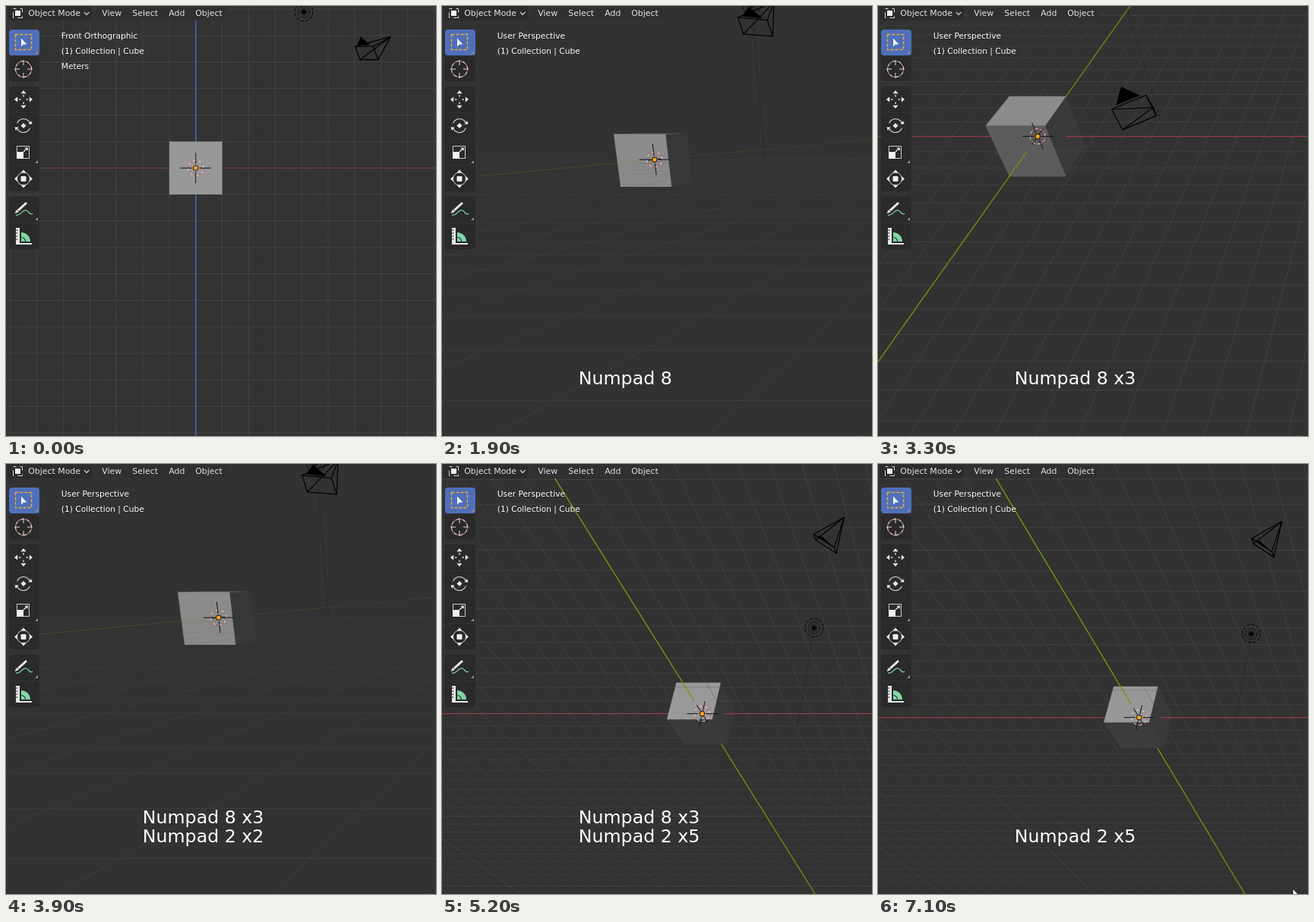
Animation, 566 px wide and 566 px high, one loop 7.2 s. Source, as an HTML page with a canvas:

```html
<!DOCTYPE html>
<html>
<head>
<meta charset="utf-8">
<style>
  html, body { margin: 0; width: 100%; height: 100%; overflow: hidden; background: #323232; }
  canvas { display: block; }
</style>
</head>
<body>
<canvas id="c" width="566" height="566"></canvas>
<script>
const g = document.getElementById('c').getContext('2d');
const LOOP = 7200, TICK = 100, FONT = '"DejaVu Sans", sans-serif';

// View: pixels per unit, orbit distance, pivot, screen centre
const S = 34.85, DIST = 31.5, PIVOT = [15.56, -3.72, -6.75], CX = 792, CY = 448.5;
const LIGHT = [4.08, 1, 5.9], CAM = [7.36, -6.93, 4.96];

// Key presses: time, key, resulting tilt
const PRESSES = [[1500, 8, 15], [2300, 8, 30], [2700, 8, 45], [3500, 2, 30],
                 [3800, 2, 15], [4100, 2, 0], [4500, 2, -15], [5200, 2, -30]];
const EIGHT_GONE = 5800;

// Face greys for tilts -30, -15, ... 45
const SHADES = {
  front: [152, 166, 152, 139, 116, 92],
  top: [120, 120, 120, 120, 130, 139],
  bottom: [60, 44, 38, 35, 35, 35],
  right: [57, 51, 53, 55, 56, 57]
};

let ortho, tilt, sin, cos, eye;

const clamp = (v, a = 0, b = 1) => Math.min(b, Math.max(a, v));
const ease = x => x * x * (3 - 2 * x);
const add = (p, ...terms) => p.map((v, i) => terms.reduce((s, [k, d]) => s + k * d[i], v));

function setView(t) {
  tilt = 0;
  for (const [at, , to] of PRESSES)
    if (t >= at) tilt += (to - tilt) * ease(clamp((t - at + 162) / 200));
  ortho = t < PRESSES[0][0];
  const a = tilt * Math.PI / 180;
  sin = Math.sin(a);
  cos = Math.cos(a);
  eye = [PIVOT[0], PIVOT[1] - DIST * cos, PIVOT[2] + DIST * sin];
}

function project([x, y, z]) {
  x -= PIVOT[0]; y -= PIVOT[1]; z -= PIVOT[2];
  const depth = DIST + y * cos - z * sin;
  const k = ortho ? S : S * DIST / depth;
  return [CX + k * x, CY - k * (y * sin + z * cos), depth];
}

function path(points, close) {
  g.beginPath();
  points.forEach(([x, y], i) => i ? g.lineTo(x, y) : g.moveTo(x, y));
  if (close) g.closePath();
}
function stroke(points, color, width = 1, close) {
  path(points, close);
  g.strokeStyle = color;
  g.lineWidth = width;
  g.stroke();
}
function fill(points, color) {
  path(points, true);
  g.fillStyle = color;
  g.fill();
}
function ring(x, y, r, color, width = 1, from = 0, to = 2 * Math.PI) {
  g.beginPath();
  g.arc(x, y, r, from, to);
  g.strokeStyle = color;
  g.lineWidth = width;
  g.stroke();
}
function dot(x, y, r, color) {
  g.beginPath();
  g.arc(x, y, r, 0, 2 * Math.PI);
  g.fillStyle = color;
  g.fill();
}
function box(x, y, w, h, color, r = 0) {
  g.beginPath();
  g.roundRect(x, y, w, h, r);
  g.fillStyle = color;
  g.fill();
}
function text(s, x, y, size, color) {
  g.font = size + 'px ' + FONT;
  g.fillStyle = color;
  g.fillText(s, x, y);
}

function flatGrid() {
  const [ox, oy] = project([0, 0, 0]);
  const lines = (step, color) => {
    for (let v = ox % step; v < 566; v += step) stroke([[v, 0], [v, 566]], color);
    for (let v = oy % step; v < 566; v += step) stroke([[0, v], [566, v]], color);
  };
  lines(S / 10, 'rgba(84,84,84,.07)');
  lines(S, 'rgba(84,84,84,.5)');
  stroke([[0, oy], [566, oy]], '#7c4048', 1.2);
  stroke([[ox, 0], [ox, 566]], '#3f6ab2', 1.6);
}

// Returns two painters: floor behind the cube and floor in front of it
function floor() {
  const layers = [new Map(), new Map()];
  const segment = (a, b, kind) => {
    const p = project(a), q = project(b);
    if (p[2] < .5 || q[2] < .5) return;
    if (Math.max(p[0], q[0]) < 0 || Math.min(p[0], q[0]) > 566) return;
    if (Math.max(p[1], q[1]) < 0 || Math.min(p[1], q[1]) > 566) return;
    const m = a.map((v, i) => (v + b[i]) / 2);
    const slope = Math.abs(eye[2]) / Math.hypot(...m.map((v, i) => v - eye[i]));
    let alpha = 1 - (1 - slope) ** 4;
    if (kind == 'unit') alpha *= .46 * Math.min(1, 32 / p[2]);
    if (kind == 'ten') alpha *= .54;
    const layer = layers[m[1] < -1 || m[0] > 1 ? 1 : 0];
    const key = kind + ' ' + Math.round(alpha * 24);
    if (!layer.has(key)) layer.set(key, new Path2D());
    layer.get(key).moveTo(p[0], p[1]);
    layer.get(key).lineTo(q[0], q[1]);
  };
  const kindOf = (n, axis) => n == 0 ? axis : n % 10 ? 'unit' : 'ten';
  for (let x = -100; x <= 24; x++)
    for (let y = -35; y < 100; y += 2) segment([x, y, 0], [x, y + 2, 0], kindOf(x, 'y'));
  for (let y = -35; y <= 100; y++)
    for (let x = -101; x < 24; x += 2) segment([x, y, 0], [x + 2, y, 0], kindOf(y, 'x'));
  const colors = { unit: '#545454', ten: '#545454', x: '#983f4b', y: '#6a9a12' };
  return layers.map(layer => () => {
    // Alphabetical order puts the axes x and y on top
    for (const key of [...layer.keys()].sort()) {
      const [kind, level] = key.split(' ');
      g.globalAlpha = level / 24;
      g.strokeStyle = colors[kind];
      g.lineWidth = kind == 'y' ? 1.4 : kind == 'x' ? 1.2 : 1;
      g.stroke(layer.get(key));
    }
    g.globalAlpha = 1;
  });
}

function cube() {
  const face = (name, corners) => {
    const f = clamp((tilt + 30) / 15, 0, 4.999), i = Math.floor(f), s = SHADES[name];
    const v = Math.round(s[i] + (s[i + 1] - s[i]) * (f - i));
    fill(corners.map(project), `rgb(${v},${v},${v})`);
  };
  const level = z => [[-1, -1, z], [1, -1, z], [1, 1, z], [-1, 1, z]];
  if (!ortho) {
    face('right', [[1, -1, -1], [1, 1, -1], [1, 1, 1], [1, -1, 1]]);
    if (eye[2] > 1) face('top', level(1));
    if (eye[2] < -1) face('bottom', level(-1));
  }
  face('front', [[-1, -1, -1], [1, -1, -1], [1, -1, 1], [-1, -1, 1]]);
}

function lamp() {
  const [x, y] = project(LIGHT);
  if (!ortho) stroke([[x, y], project([LIGHT[0], LIGHT[1], 0])], 'rgba(0,0,0,.2)');
  dot(x, y, 2.6, '#000');
  ring(x, y, 4, '#000', .6);
  g.setLineDash([3, 2]);
  ring(x, y, 7.5, '#000', .9);
  g.setLineDash([4, 2.3]);
  ring(x, y, 12, '#000');
  g.setLineDash([]);
}

function cameraRig() {
  const right = [.686, .728, 0], up = [-.324, .305, .8955], ahead = [-.6516, .6142, -.445];
  const at = (u, v) => project(add(CAM, [1.389, ahead], [u, right], [v, up]));
  const apex = project(CAM);
  const frame = [at(-.5, -.281), at(.5, -.281), at(.5, .281), at(-.5, .281)];
  stroke(frame, '#000', 1.2, true);
  frame.forEach(p => stroke([apex, p], '#000', 1.2));
  fill([at(-.35, .331), at(.35, .331), at(0, .694)], '#000');
}

function dashedRing(x, y, r, width, red) {
  for (let i = 0; i < 16; i++)
    ring(x, y, r, i % 2 ? '#f0e6e6' : red, width, i * Math.PI / 8, (i + 1) * Math.PI / 8);
}

function cursor3d() {
  const [x, y] = project([0, 0, 0]);
  dashedRing(x, y, 10, 1, '#d4504c');
  const unit = 20 / (project([1, 0, 0])[0] - x);
  for (let i = 0; i < 3; i++) {
    if (ortho && i == 1) continue;
    for (const side of [-1, 1]) {
      const arm = [.25, 1].map(k => {
        const p = [0, 0, 0];
        p[i] = side * k * unit;
        return project(p);
      });
      stroke(arm, '#111');
    }
  }
  dot(x, y, 3.6, '#111');
  dot(x, y, 2.7, '#ffa01c');
}

function header() {
  box(2, -4, 111, 23, '#2c2c2c', 4);
  box(119, -4, 172, 23, '#303030', 4);
  g.strokeStyle = '#ddd';
  g.lineWidth = 1;
  g.setLineDash([4, 5, 4, 0]);
  g.strokeRect(9.5, 3.5, 12, 12);
  g.setLineDash([]);
  box(12, 6, 7, 7, '#eee');
  stroke([[103, 8], [106, 11.5], [109.5, 8]], '#ccc', 1.2);
  [['Object Mode', 29], ['View', 126], ['Select', 166], ['Add', 214], ['Object', 249]]
    .forEach(([s, x]) => text(s, x + .3, 13, 10.9, '#e2e2e2'));
}

function corner(y) {
  fill([[42, y - 4], [42, y], [38, y]], '#8d8d8d');
}

// Four arrowheads around a centre
function arrows(x, y, near, far, half) {
  for (let i = 0; i < 4; i++) {
    g.save();
    g.translate(x, y);
    g.rotate(i * Math.PI / 2);
    fill([[far, 0], [near, -half], [near, half]], '#eee');
    g.restore();
  }
}

function toolbar() {
  box(4, 31, 40, 34, '#4f6fbb', 4);
  [[66, 33], [106, 138], [251, 69]].forEach(([y, h]) => box(4, y, 40, h, '#2a2a2a', 4));
  [140.5, 175, 209.5, 285.5].forEach(y => stroke([[4, y], [44, y]], '#313131'));
  [63, 207, 282].forEach(corner);

  // select
  g.setLineDash([4, 2]);
  g.strokeStyle = '#f0ac33';
  g.lineWidth = 1.4;
  g.strokeRect(12.5, 37.5, 21, 20);
  g.setLineDash([]);
  fill([[20, 42.5], [20, 53.5], [23, 50.5], [27.5, 50.5]], '#f2f2f2');

  // cursor
  dashedRing(23, 83, 10.5, 1.1, '#c77a74');
  for (const d of [-1, 1]) {
    stroke([[23 + 5 * d, 83], [23 + 12 * d, 83]], '#ddd');
    stroke([[23, 83 + 5 * d], [23, 83 + 12 * d]], '#ddd');
  }

  // move
  arrows(23, 123, 7.8, 12, 3.5);
  for (const d of [-1, 1]) {
    stroke([[23 + 3.5 * d, 123], [23 + 6 * d, 123]], '#eee', 1.3);
    stroke([[23, 123 + 3.5 * d], [23, 123 + 6 * d]], '#eee', 1.3);
  }

  // rotate
  ring(23, 157.5, 9, '#ddd', 1.1, 3.5, 5.9);
  ring(23, 157.5, 9, '#ddd', 1.1, .35, 2.75);
  fill([[29.5, 155.5], [34.5, 155.5], [33, 151]], '#eee');
  fill([[11.5, 159.5], [16.5, 159.5], [13, 164]], '#eee');
  fill([[23, 154], [26.5, 157.5], [23, 161], [19.5, 157.5]], '#eee');

  // scale
  g.strokeStyle = '#ccc';
  g.lineWidth = 1;
  g.strokeRect(14.5, 184.5, 16, 16);
  box(14, 192, 9, 9, '#f2f2f2');
  stroke([[23, 192], [27, 188]], '#eee', 1.3);
  fill([[24.5, 186.5], [28.8, 186.5], [28.8, 190.8]], '#eee');

  // transform
  ring(23, 227.5, 8.5, '#ccc');
  arrows(23, 227.5, 8, 12, 3.5);
  box(18.5, 223, 9, 9, '#2a2a2a');
  box(19.5, 224, 7, 7, '#eee', 1);

  // annotate
  stroke([[16, 269], [27, 259]], '#eee', 3);
  fill([[11.5, 273], [14, 268], [17, 271]], '#eee');
  g.beginPath();
  g.moveTo(13, 275);
  g.bezierCurveTo(20, 277, 21, 267, 27, 269);
  g.bezierCurveTo(31, 271, 31, 276, 35, 273);
  g.strokeStyle = '#7fd6a4';
  g.lineWidth = 1.3;
  g.stroke();

  // measure
  g.beginPath();
  g.moveTo(20, 310);
  g.lineTo(20, 298);
  g.arc(20, 310, 12, -Math.PI / 2, 0);
  g.fillStyle = '#7fd6a4';
  g.fill();
  ring(20, 310, 5.5, '#2a2a2a', 1.2, -Math.PI / 2, 0);
  box(13, 292, 5, 22, '#e6e6e6');
  box(13, 312, 21, 2, '#e6e6e6');
  for (let y = 295; y < 310; y += 4) stroke([[13, y], [15.5, y]], '#2a2a2a');
}

function labels(t) {
  const lines = ortho
    ? ['Front Orthographic', '(1) Collection | Cube', 'Meters']
    : ['User Perspective', '(1) Collection | Cube'];
  lines.forEach((s, i) => {
    const y = 42.5 + 20 * i;
    text(s, 73, y + 1, 10.65, 'rgba(0,0,0,.4)');
    text(s, 72.8, y, 10.65, '#fff');
  });
  const count = key => PRESSES.filter(p => p[1] == key && t >= p[0]).length;
  const caption = key => {
    const n = count(key);
    return n ? 'Numpad ' + key + (n > 1 ? ' x' + n : '') : '';
  };
  [caption(2), t < EIGHT_GONE ? caption(8) : '']
    .filter(Boolean)
    .forEach((s, i) => text(s, 179.8, 498 - 25 * i, 23.7, '#fff'));
}

function pointer(t) {
  const k = ease(clamp((t - 6300) / 400));
  const x = 551 - 5 * k, y = 564 - 5 * k;
  const tip = [[0, 0], [0, 11], [2.6, 8.6], [4.5, 12.5], [6, 11.8], [4.3, 8], [7.5, 8]]
    .map(([a, b]) => [x + a, y + b]);
  fill(tip, '#fff');
  stroke(tip, '#111', .8, true);
}

function draw(t) {
  setView(t);
  box(0, 0, 566, 566, '#323232');
  if (ortho) {
    flatGrid();
    cube();
  } else {
    const [back, front] = floor();
    back();
    cube();
    front();
  }
  lamp();
  cameraRig();
  cursor3d();
  header();
  toolbar();
  labels(t);
  pointer(t);
}

const start = performance.now();
let shown = -1;
function frame() {
  const tick = Math.floor((performance.now() - start) % LOOP / TICK);
  if (tick != shown) draw((shown = tick) * TICK);
  requestAnimationFrame(frame);
}
frame();
</script>
</body>
</html>
```
